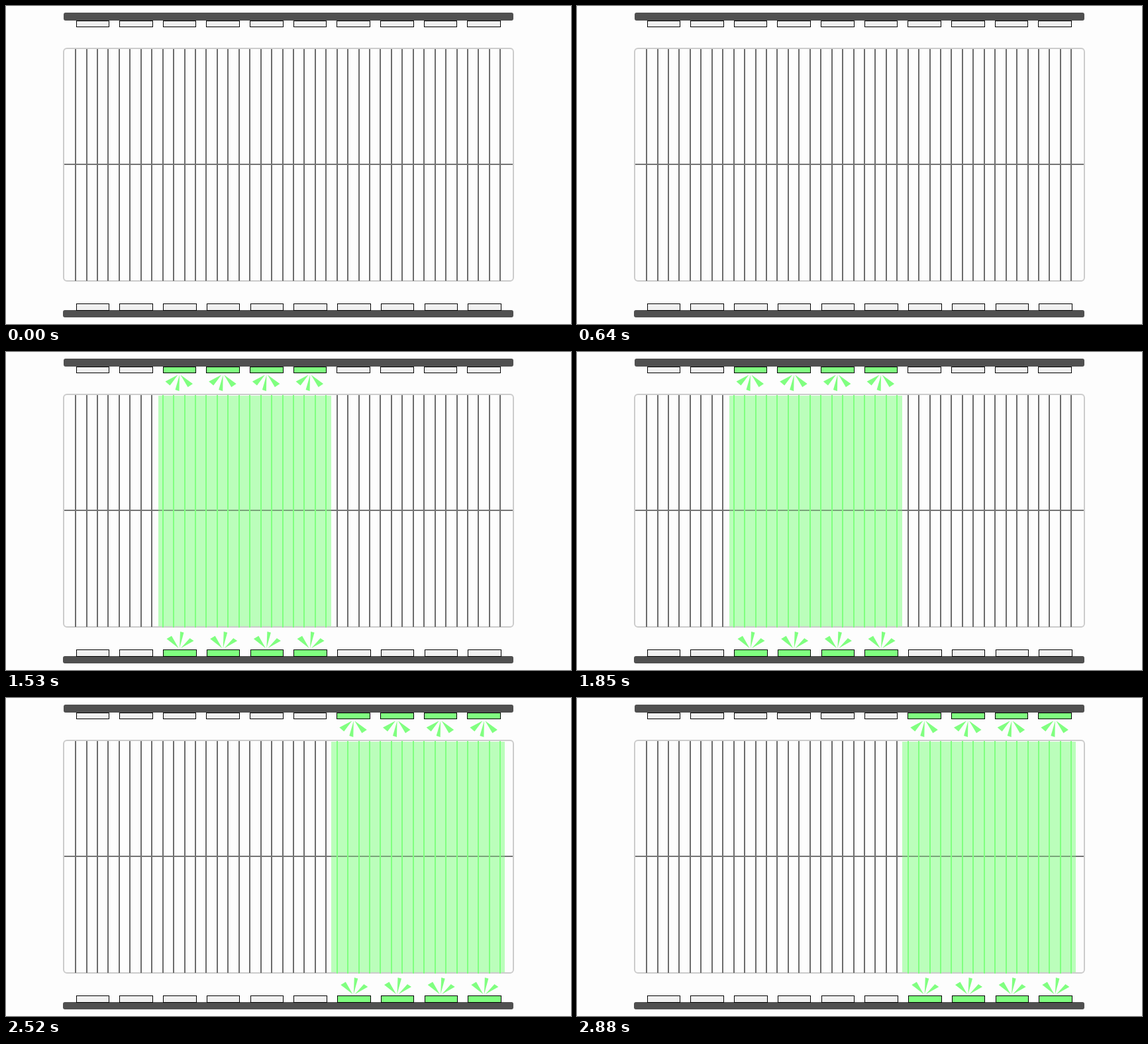
Animation of 853 by 480 pixels, one loop 3120 ms. Source, as an HTML page:

```html
<!DOCTYPE html>
<html lang="en">
<head>
<meta charset="utf-8">
<title>Scanning zones</title>
<style>
  html, body { margin: 0; width: 100%; height: 100%; overflow: hidden; background: #fdfdfd; }
  svg { display: block; width: 100%; height: 100%; }
</style>
</head>
<body>
<svg id="stage" viewBox="0 0 853 480"></svg>
<script>
const stage = document.getElementById('stage');
const LOOP = 3120;
const STEP_TIMES = [1070, 1530, 2060, 2520];
const PAD_COUNT = 10;
const WIRE_COUNT = 40;
const PADS_LIT = 4;
const PAD_WIDTH = 50.5;

const GREEN = '#80ff80';
const BAR = '#505050';
const WIRE = '#6c6c6c';
const AXIS = '#757575';
const PAD = '#f0f0f0';

const topRay = 'M22 34.5L3 44.5L10 50.5ZM24.5 34.5L18 57L24 59ZM26 34.5L37 53L44.5 48Z';
const bottomRay = 'M23 447L5 433L12.5 428.5ZM24.5 447L25.5 422L31 423.5ZM26.5 447L40 432L46 436Z';

const range = (count, make) => Array.from({ length: count }, (_, i) => make(i));
const wireX = i => Math.round(105.16 + 16.44 * i);
const rayX = i => 106.1 + 65.7 * i;
const stripEdge = n => Math.round(99 + 130.7 * n);

function set(node, attrs) {
  for (const key in attrs) node.setAttribute(key, attrs[key]);
}

function add(tag, attrs) {
  const node = document.createElementNS('http://www.w3.org/2000/svg', tag);
  set(node, attrs);
  stage.appendChild(node);
  return node;
}

function box(x, y, width, height, attrs) {
  return add('rect', { x, y, width, height, ...attrs });
}

function show(node, visible) {
  node.setAttribute('visibility', visible ? 'visible' : 'hidden');
}

function padRow(start, pitch, y, height, ray) {
  return range(PAD_COUNT, i => {
    const x = start + pitch * i;
    const left = Math.round(x);
    const width = Math.round(x + PAD_WIDTH) - left;
    return {
      body: box(left + 0.5, y + 0.5, width - 1, height - 1, { stroke: '#000' }),
      rays: add('path', { d: ray, transform: `translate(${rayX(i)})`, fill: GREEN })
    };
  });
}

box(87, 10, 679, 12, { rx: 3, fill: BAR });
box(86, 459, 680, 11, { rx: 3, fill: BAR });
box(87, 64, 679, 351, { rx: 5, fill: 'none', stroke: '#ccc', 'stroke-width': 2 });

const wires = range(WIRE_COUNT, i => box(wireX(i) - 1, 65, 2, 350, { fill: WIRE }));
box(88, 238, 677, 2, { fill: AXIS });
const strip = box(0, 66, 0, 348, { fill: GREEN, 'fill-opacity': 0.53 });
// A second, fainter pass keeps the axis visible through the strip.
box(88, 238, 677, 2, { fill: AXIS, 'fill-opacity': 0.35 });
const litWires = range(WIRE_COUNT, i => box(wireX(i) - 1, 65, 2, 351, { fill: GREEN }));

const rows = [
  padRow(105.5, 65.66, 22, 10, topRay),
  padRow(105.7, 65.75, 449, 11, bottomRay)
];

function draw(time) {
  const step = STEP_TIMES.filter(t => time >= t).length - 1;
  const active = step >= 0;
  const left = stripEdge(step);
  const right = stripEdge(step + 2);

  set(strip, { x: left, width: active ? right - left : 0 });
  wires.forEach((wire, i) => {
    const lit = active && wireX(i) > left && wireX(i) < right;
    show(wire, !lit);
    show(litWires[i], lit);
  });
  for (const row of rows) {
    row.forEach((pad, i) => {
      const lit = active && i >= step * 2 && i < step * 2 + PADS_LIT;
      set(pad.body, { fill: lit ? GREEN : PAD });
      show(pad.rays, lit);
    });
  }
}

const start = performance.now();
function tick() {
  draw((performance.now() - start) % LOOP);
  requestAnimationFrame(tick);
}
tick();
</script>
</body>
</html>
```
